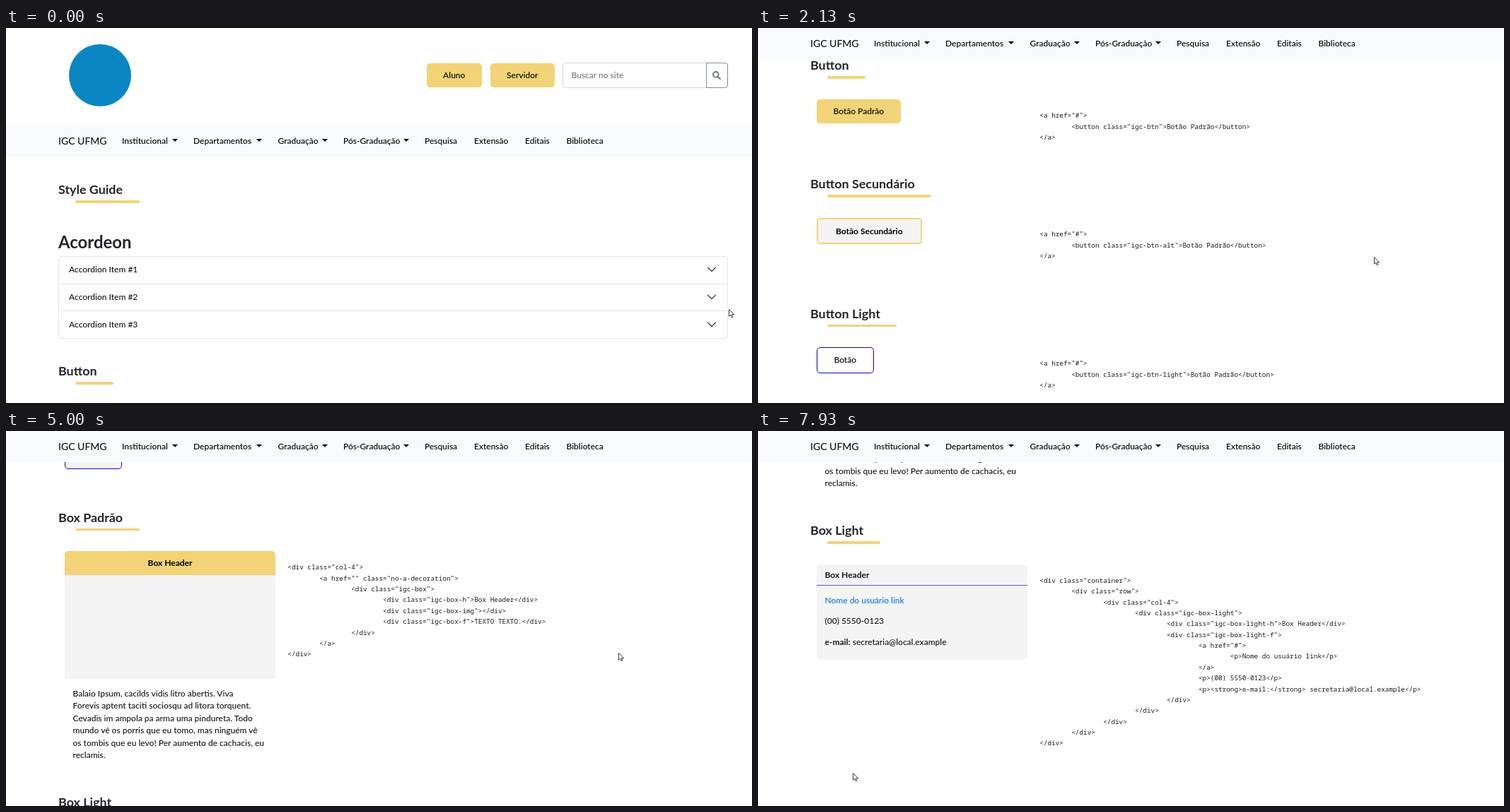
An HTML page for the animation above (8 s loop, 1055 by 531 pixels).

```html
<!DOCTYPE html>
<html lang="pt-BR">
<head>
<meta charset="utf-8">
<title>Style Guide</title>
<style>
  html, body { margin: 0; width: 100%; height: 100%; overflow: hidden; background: #fff; }
  #stage { position: relative; width: 1055px; height: 531px; overflow: hidden; background: #fff;
    font: 500 12px/20px Lato, "Open Sans", sans-serif; color: #111417; }
  #page, #nav, #cursor { position: absolute; left: 0; top: 0; }
  #page, #nav { width: 1055px; }
  #page { height: 2100px; }
  #nav { height: 46px; background: #f8fafc; color: #000; }
  #stage div, #stage svg, pre { position: absolute; box-sizing: border-box; margin: 0; white-space: pre; }
  #stage .title { font-size: 17.9px; font-weight: 700; color: #212529; }
  .title::after { content: ""; position: absolute; left: 23.5px; top: 26.2px; width: 100%; height: 3.6px;
    border-radius: 2px; background: #f2d377; }
  #stage .big { font-size: 23.9px; font-weight: 700; color: #212529; }
  .bold { font-weight: 700; }
  .brand { font-size: 14px; font-weight: 400; }
  .btn { display: flex; align-items: center; justify-content: center; border-radius: 5px; color: #000; }
  .yellow { background: #f2d377; }
  .alt { background: #f4f4f4; border: 2px solid #f2d377; font-weight: 700; }
  .light { border: 1.5px solid #0808b8; }
  .grey { background: #f4f4f4; }
  .caret { border: 4px solid transparent; border-top-color: #000; border-bottom: 0; }
  pre { font: 500 9.37px/15.37px "Noto Sans Mono", "DejaVu Sans Mono", monospace; tab-size: 8; color: #16191c; }
  .link { color: #0d6efd; }
  .muted { color: #6c757d; }
</style>
</head>
<body>
<div id="stage">
  <div id="page"></div>
  <div id="nav"></div>
  <svg id="cursor" width="9" height="13"><path d="M.5 .6V10.2L2.8 8.2 4.3 11.8 5.9 11.1 4.5 7.7H7.6Z" fill="#fff" stroke="#222" stroke-width=".9"/></svg>
</div>
<script>
const page = document.getElementById('page');
const nav = document.getElementById('nav');
const cursor = document.getElementById('cursor');

function add(parent, tag, cls, style, text = '') {
  const el = document.createElement(tag);
  el.className = cls;
  for (const key in style) el.style[key] = style[key] + 'px';
  el.textContent = text;
  parent.append(el);
  return el;
}
// Text is placed by its left edge and the middle of its line.
const label = (x, y, text, cls = '', parent = page) =>
  add(parent, 'div', cls, { left: x, top: y - 10 }, text);
const box = (x, y, width, height, cls, text) =>
  add(page, 'div', cls, { left: x, top: y, width, height }, text);
const code = (y, text) => add(page, 'pre', '', { left: 398.3, top: y - 7.7 }, text);
function drawing(x, y, width, height, path, stroke, weight) {
  const holder = box(x, y, width, height, '');
  holder.innerHTML = `<svg width="${width}" height="${height}"><path d="${path}" fill="none" stroke="${stroke}" stroke-width="${weight}" stroke-linecap="round" stroke-linejoin="round"/></svg>`;
}

// Header
box(89, 23, 88, 88, '').style.cssText += 'background:#0a86c3;border-radius:50%';
box(594.5, 49.5, 78.5, 34, 'btn yellow', 'Aluno');
box(684.5, 49.5, 91.5, 34, 'btn yellow', 'Servidor');
box(787, 49, 204, 35.5, '').style.cssText += 'border:1px solid #d3d8dd;border-radius:4px 0 0 4px';
label(799.5, 67, 'Buscar no site', 'muted');
box(990, 49, 31, 35.5, '').style.cssText += 'border:1px solid #868d94;border-radius:0 4px 4px 0';
drawing(998, 60, 14, 14, 'M9.6 5.8A3.8 3.8 0 1 1 2 5.8A3.8 3.8 0 1 1 9.6 5.8M8.8 8.8L12 12', '#6c757d', 1.9);

// Navigation
label(74, 23.5, 'IGC UFMG', 'brand', nav);
[['Institucional', 164, 234.5], ['Departamentos', 265, 353.5], ['Graduação', 384.5, 446.5],
 ['Pós-Graduação', 477, 561.5], ['Pesquisa', 592], ['Extensão', 662], ['Editais', 734], ['Biblioteca', 792.5]]
  .forEach(([text, x, caretX]) => {
    label(x, 23.5, text, '', nav);
    if (caretX) add(nav, 'div', 'caret', { left: caretX, top: 20.5 });
  });

// Section titles
[['Style Guide', 228], ['Button', 485], ['Button Secundário', 653], ['Button Light', 836.5],
 ['Button Light G', 1019.5], ['Box Padrão', 1202.5], ['Box Light', 1606], ['Tabela', 2003.5]]
  .forEach(([text, y]) => label(74, y, text, 'title'));
label(74, 303, 'Acordeon', 'big');

// Accordion
box(74, 322.5, 947, 117, '').style.cssText += 'border:1px solid #e2e3e5;border-radius:4px';
for (let i = 0; i < 3; i++) {
  const y = 342.3 + i * 38.7;
  if (i) box(74, y - 19.3, 947, 1, '').style.background = '#e2e3e5';
  label(89, y, 'Accordion Item #' + (i + 1));
  drawing(991, y - 5, 14, 10, 'M1.5 2.2L7 7.7L12.5 2.2', '#212529', 1.2);
}

// Buttons
box(83, 534, 118.5, 34, 'btn yellow', 'Botão Padrão');
box(83, 702, 148.5, 37, 'btn alt', 'Botão Secundário');
box(83, 885, 80.5, 36.5, 'btn light', 'Botão');
box(83, 1068, 80.5, 67, 'btn light grey', 'Botão');
[['btn', 557], ['btn-alt', 725], ['btn-light', 908], ['btn-light-g', 1091]].forEach(([name, y]) =>
  code(y, `<a href="#">\n\t<button class="igc-${name}">Botão Padrão</button>\n</a>`));

// Default box
box(83, 1251, 298, 180.5, 'grey').style.borderRadius = '5px 5px 0 0';
box(83, 1251, 298, 34, 'btn yellow bold', 'Box Header').style.borderRadius = '5px 5px 0 0';
['Balaio Ipsum, cacilds vidis litro abertis. Viva',
 'Forevis aptent taciti sociosqu ad litora torquent.',
 'Cevadis im ampola pa arma uma pindureta. Todo',
 'mundo vê os porris que eu tomo, mas ninguém vê',
 'os tombis que eu levo! Per aumento de cachacis, eu',
 'reclamis.'].forEach((line, i) => label(94.5, 1452.5 + i * 17.55, line));
code(1274, `<div class="col-4">
	<a href="" class="no-a-decoration">
		<div class="igc-box">
			<div class="igc-box-h">Box Header</div>
			<div class="igc-box-img"></div>
			<div class="igc-box-f">TEXTO TEXTO.</div>
		</div>
	</a>
</div>`);

// Light box
const phone = '(00) 5550-0123', email = 'secretaria@local.example';
box(83, 1654.5, 298, 135.5, 'grey').style.borderRadius = '5px';
label(94.5, 1670, 'Box Header', 'bold');
box(83, 1684, 298, 1, '').style.background = '#5a5acb';
label(94.5, 1706, 'Nome do usuário link', 'link');
label(94.5, 1735, phone);
label(94.5, 1764.5, '').innerHTML = `<b>e-mail:</b> ${email}`;
code(1677.5, `<div class="container">
	<div class="row">
		<div class="col-4">
			<div class="igc-box-light">
				<div class="igc-box-light-h">Box Header</div>
				<div class="igc-box-light-f">
					<a href="#">
						<p>Nome do usuário link</p>
					</a>
					<p>${phone}</p>
					<p><strong>e-mail:</strong> ${email}</p>
				</div>
			</div>
		</div>
	</div>
</div>`);

// Timeline, in steps of 1/15 s
const LOOP = 8000, STEP = 200 / 3, NOTCH = 77.18;
// start, end, wheel notches
const bursts = [[8, 17, 3], [23, 44, 6], [49, 53, 1], [54, 59, 2], [59, 69, 2], [80, 88, 2], [101, 119, 3]];
// step, x, y
const path = [[0, 1022, 398], [4, 880, 326], [8, 880, 326], [17, 884, 326], [18, 884, 326], [21, 873, 326],
  [24, 873, 326], [44, 867, 320], [55, 867, 320], [59, 866, 320], [69, 865, 318], [71, 865, 318],
  [75, 866, 314], [80, 866, 314], [88, 855, 317], [101, 134, 484], [120, 134, 484]];

const smooth = p => p * p * (3 - 2 * p);
function scrollAt(step) {
  let notches = 0;
  for (const [start, end, count] of bursts) {
    const p = Math.min(1, Math.max(0, (step - start) / (end - start))) * count;
    notches += Math.floor(p) + smooth(p % 1);
  }
  return notches * NOTCH;
}
function pointerAt(step) {
  const i = path.findIndex(key => key[0] > step);
  const [s0, x0, y0] = path[i - 1], [s1, x1, y1] = path[i];
  const p = (step - s0) / (s1 - s0);
  return [x0 + (x1 - x0) * p, y0 + (y1 - y0) * p].map(Math.round);
}
function render(time) {
  const step = Math.min(119, Math.floor((time % LOOP + 4) / STEP));
  const scroll = Math.round(scrollAt(step));
  const [x, y] = pointerAt(step);
  page.style.transform = `translateY(${-scroll}px)`;
  nav.style.transform = `translateY(${Math.max(136 - scroll, -2)}px)`;
  cursor.style.transform = `translate(${x}px,${y}px)`;
}
const begin = performance.now();
function tick() {
  render(performance.now() - begin);
  requestAnimationFrame(tick);
}
tick();
</script>
</body>
</html>
```
